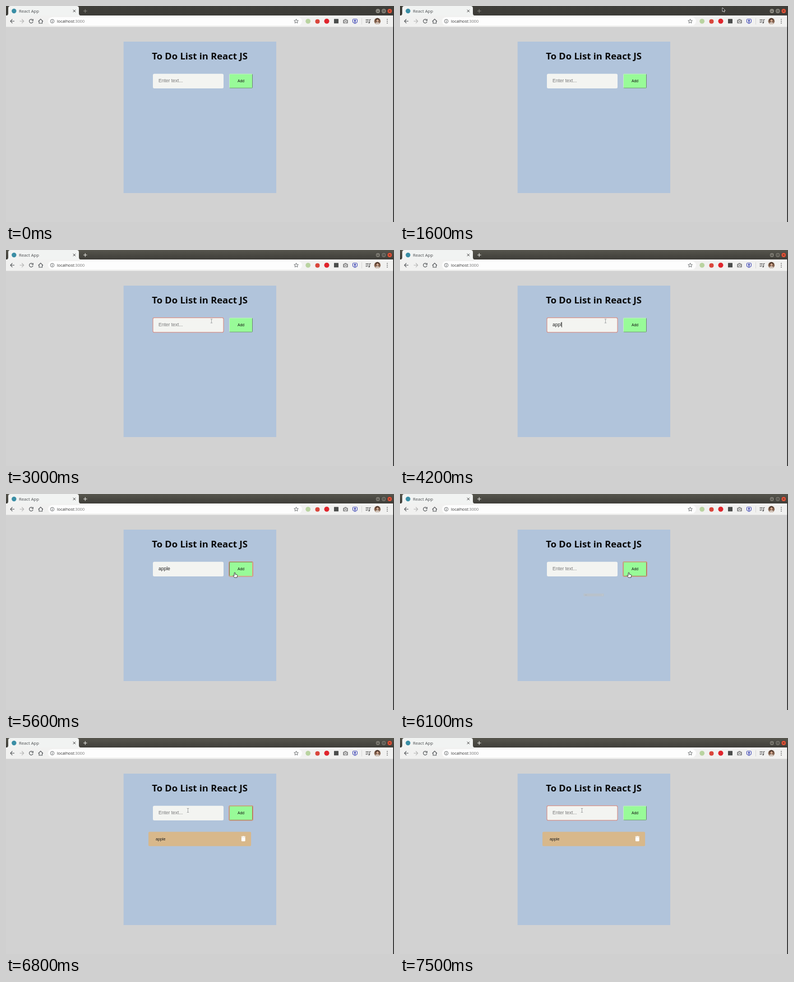
Recreate the animation shown at these times as an HTML page with a canvas. Size 692 by 388 pixels, loop 8000 ms.

```html
<!DOCTYPE html>
<html lang="en">
<head>
<meta charset="utf-8">
<title>To Do List</title>
<style>
html, body { margin: 0; width: 100%; height: 100%; overflow: hidden; background: #d2d2d2; }
canvas { display: block; width: 692px; height: 388px; }
</style>
</head>
<body>
<canvas id="stage" width="692" height="388"></canvas>
<script>
const ctx = document.getElementById('stage').getContext('2d');
const LOOP = 8000, STEP = 100;
const UI = '"Open Sans", "Noto Sans", sans-serif';
const ARIAL = '"Liberation Sans", Arial, sans-serif';
const FOCUS = '#d5928b';

// Moments of the interaction, in ms
const T = { focus: 2500, press: 5600, release: 6100, refocus: 6900 };
const keys = [3400, 3700, 3900, 4200, 4400];
const caretStarts = [2500, 3400, 3700, 3900, 4200, 4500, 7000];
const pointer = [
  [1600, 575, 3], [1900, 480, 72], [2300, 366.5, 127.5], [4900, 366.5, 127.5],
  [5100, 381, 133], [5400, 408, 141], [6100, 408, 141], [6300, 391.5, 148],
  [6500, 371, 196], [6800, 324.5, 130]
];

function box(x, y, w, h, fill, r = 0) {
  ctx.beginPath();
  ctx.roundRect(x, y, w, h, r);
  ctx.fillStyle = fill;
  ctx.fill();
}

function frame(x, y, w, h, color, r = 0, width = 1) {
  ctx.beginPath();
  ctx.roundRect(x, y, w, h, r);
  ctx.strokeStyle = color;
  ctx.lineWidth = width;
  ctx.stroke();
}

function disc(x, y, r, fill) {
  ctx.beginPath();
  ctx.arc(x, y, r, 0, Math.PI * 2);
  ctx.fillStyle = fill;
  ctx.fill();
}

function path(d, stroke, width = 1, fill) {
  const p = new Path2D(d);
  if (fill) { ctx.fillStyle = fill; ctx.fill(p); }
  if (stroke) {
    ctx.strokeStyle = stroke;
    ctx.lineWidth = width;
    ctx.stroke(p);
  }
}

function text(str, x, y, font, color, align = 'left') {
  ctx.font = font;
  ctx.fillStyle = color;
  ctx.textAlign = align;
  ctx.fillText(str, x, y);
  return ctx.measureText(str).width;
}

function drawTitleBar(active) {
  const g = ctx.createLinearGradient(0, 0, 0, 17);
  g.addColorStop(0, active ? '#56554d' : '#403f3a');
  g.addColorStop(1, active ? '#3f3e39' : '#3c3b37');
  box(0, 0, 692, 17, g);
  path('M1 17Q4 17 4 13V4Q4 0 8 0H126Q130 0 130 4V13Q130 17 133 17Z', null, 0, '#f1f3f2');
  disc(14.3, 9, 4.2, '#3a8ea5');
  text('React App', 23, 11.8, '7.7px ' + UI, '#4b4d50');
  path('M119.6 6.7L124 11.1M124 6.7L119.6 11.1', '#4a4a4a', 1);
  path('M138 9H144.6M141.3 5.7V12.3', active ? '#e4e3df' : '#85847e', 1.1);

  const grey = active ? '#77756d' : '#8b8981';
  [[663.3, grey], [673.8, grey], [684.3, '#e2543a']].forEach(([x, c]) => {
    disc(x, 9, 4.5, '#36352f');
    disc(x, 9, 3.9, c);
  });
  path('M661.6 9.5H665', '#3a3933', 0.9);
  frame(672.2, 7.6, 3.2, 2.8, '#3a3933', 0, 0.8);
  path('M682.8 7.5L685.8 10.5M685.8 7.5L682.8 10.5', '#50251a', 0.9);
}

function drawExtensions() {
  disc(538.7, 27.3, 4.4, '#b9d3a0');
  disc(555.5, 27.8, 4, '#d9453b');
  disc(572, 27.3, 4.5, '#e0242c');
  box(585, 23.2, 8, 8, '#4b4d4c', 0.5);
  box(601.2, 24.8, 8.6, 6.4, '#858585', 1);
  box(603.6, 23.6, 3.8, 2, '#858585', 0.5);
  disc(605.5, 28, 2.4, '#f1f1f0');
  disc(605.5, 28, 1.2, '#858585');
  frame(618.4, 23.6, 8, 6.2, '#3a43b5', 1, 1);
  disc(622.4, 26.6, 1.7, '#3a43b5');
  box(620.4, 30.6, 4, 1, '#3a43b5');
  box(634, 22, 0.8, 11, '#d4d4d2');
  path('M641.5 24.5H647M641.5 27H647M641.5 29.5H645M648.6 24V29.8M648.3 24.4H650.6', '#555', 1);
  disc(647.6, 30, 1.3, '#555');

  ctx.save();
  disc(662.4, 27.3, 5.8, '#8a6a55');
  ctx.clip();
  disc(662.4, 25.4, 3.6, '#4a3328');
  disc(662.6, 26.4, 2.3, '#cfa58c');
  disc(662.4, 33.2, 4.2, '#d3c5bb');
  ctx.restore();
  [24, 27.3, 30.6].forEach(y => disc(680, y, 0.85, '#555'));
}

function drawToolbar() {
  box(0, 17, 692, 20.5, '#f1f1f0');
  const ink = '#55585b';
  path('M15 27.3H8M11.4 23.7L7.9 27.3L11.4 30.9', ink, 1.1);
  path('M24.5 27.3H31.5M28.2 23.7L31.7 27.3L28.2 30.9', '#b4b4b3', 1.1);
  path('M47.5 25A3.4 3.4 0 1 0 48.2 28.2M48.4 23.5V26.3H45.6', ink, 1.1);
  path('M57.6 27.6L61.8 23.6L66 27.6M59 26.7V31H64.6V26.7', ink, 1.1);
  box(75, 20, 453, 15, '#fdfdfd', 7.5);
  ctx.beginPath();
  ctx.arc(82.5, 27.3, 3.3, 0, 7);
  ctx.strokeStyle = ink;
  ctx.lineWidth = 0.8;
  ctx.stroke();
  path('M82.5 26.8V29.3M82.5 25.2V26', ink, 0.9);
  const w = text('localhost', 91, 29.9, '7.3px ' + UI, '#333');
  text(':3000', 91 + w, 29.9, '7.3px ' + UI, '#777');

  ctx.beginPath();
  for (let i = 0; i < 10; i++) {
    const a = i * Math.PI / 5 - Math.PI / 2, r = i % 2 ? 1.8 : 4;
    ctx.lineTo(517.6 + r * Math.cos(a), 27.5 + r * Math.sin(a));
  }
  ctx.closePath();
  ctx.strokeStyle = ink;
  ctx.lineWidth = 0.8;
  ctx.stroke();
  drawExtensions();
}

function caretOn(t) {
  const start = caretStarts.filter(s => s <= t).pop();
  return start !== undefined && Math.floor((t - start) / 500) % 2 === 0;
}

function drawInput(t) {
  const focused = (t >= T.focus && t < T.press) || t >= T.refocus;
  box(262, 121.7, 126, 26.3, '#f3f4f1', 2.5);
  if (focused) frame(262, 121.7, 126, 26.2, FOCUS, 2.5, 1.2);
  const typed = t < T.release ? 'apple'.slice(0, keys.filter(k => k <= t).length) : '';
  const font = '8.5px ' + ARIAL;
  const w = typed ? text(typed, 272, 137.3, font, '#222') : 0;
  if (!typed) text('Enter text...', 272, 137.3, font, '#7b7b7b');
  if (focused && caretOn(t)) box(272 + w, 129.5, 0.8, 9.5, '#222');
}

function drawButton(t) {
  const pressed = t >= T.press && t < T.release;
  const focused = t >= T.press && t < T.refocus;
  if (focused) frame(397.8, 121.5, 42.6, 26.6, '#d98c78', 2, 1.2);
  const [light, dark] = pressed ? ['#7d6f55', '#d9a58c']
    : focused ? ['#c4957c', '#a5705c'] : ['#c9e9cd', '#6f8578'];
  ctx.save();
  box(398, 121.7, 42, 26.1, '#98fb98', 2);
  ctx.clip();
  path('M398.5 148V122.2H440', light, 1);
  path('M398 147.3H439.5V121.7', dark, 1);
  ctx.restore();
  text('Add', 419, 137.2, '6.75px ' + ARIAL, '#111', 'center');
}

function drawItem(t) {
  if (t < T.release) return;
  const p = Math.min(1, (t - 6000) / 350);
  const s = p * p * (3 - 2 * p);
  ctx.save();
  ctx.translate(345.6, 181.3);
  ctx.scale(s, s);
  ctx.globalAlpha = s;
  box(-91.5, -12.7, 183, 25.6, '#d8b88b', 2);
  text('apple', -78.7, 2.3, '7.2px ' + ARIAL, '#1c1c1c');
  box(74.3, -3.1, 6.8, 7.2, '#fff', 0.8);
  box(73.9, -4.6, 7.6, 1.1, '#fff');
  box(76.2, -5.2, 3, 0.8, '#fff');
  ctx.restore();
}

function pointerAt(t) {
  if (t < pointer[0][0]) return null;
  const i = pointer.findIndex(k => k[0] > t);
  if (i < 0) return pointer[pointer.length - 1].slice(1);
  const [t0, x0, y0] = pointer[i - 1], [t1, x1, y1] = pointer[i];
  const p = (t - t0) / (t1 - t0);
  return [x0 + (x1 - x0) * p, y0 + (y1 - y0) * p];
}

function drawPointer(t) {
  const pos = pointerAt(t);
  if (!pos) return;
  const [x, y] = pos;
  const within = (l, r) => x > l && x < r && y > 122 && y < 148;
  ctx.save();
  ctx.translate(x, y);
  if (within(262, 388)) {
    path('M-1.8 -3.5H1.8M0 -3.5V3.5M-1.8 3.5H1.8', '#888b8d', 0.7);
  } else if (within(398, 440)) {
    path('M-.9 .5Q0 -.8 .9 .5V3.2L4 3.9Q5 4.2 4.8 5.5L4 9H-.5L-3 5.7Q-3 4.4 -.9 5.6Z',
      '#222', 0.8, '#fff');
  } else {
    path('M0 0V7.2L1.7 5.7L2.9 8L4.1 7.4L3 5.2H5.2Z', '#fff', 0.7, '#111');
  }
  ctx.restore();
}

function draw(t) {
  box(0, 0, 692, 388, '#d2d2d2');
  drawTitleBar(t >= T.focus);
  drawToolbar();
  box(209.7, 64, 272.3, 272, '#b1c4db');
  text('To Do List in React JS', 345.6, 96, 'bold 16.7px ' + UI, '#080808', 'center');
  drawInput(t);
  drawButton(t);
  drawItem(t);
  box(690.6, 17, 1.4, 371, '#111');
  drawPointer(t);
}

const began = performance.now();
function tick() {
  const t = (performance.now() - began) % LOOP;
  draw(Math.floor(t / STEP) * STEP);
  requestAnimationFrame(tick);
}
tick();
</script>
</body>
</html>
```
